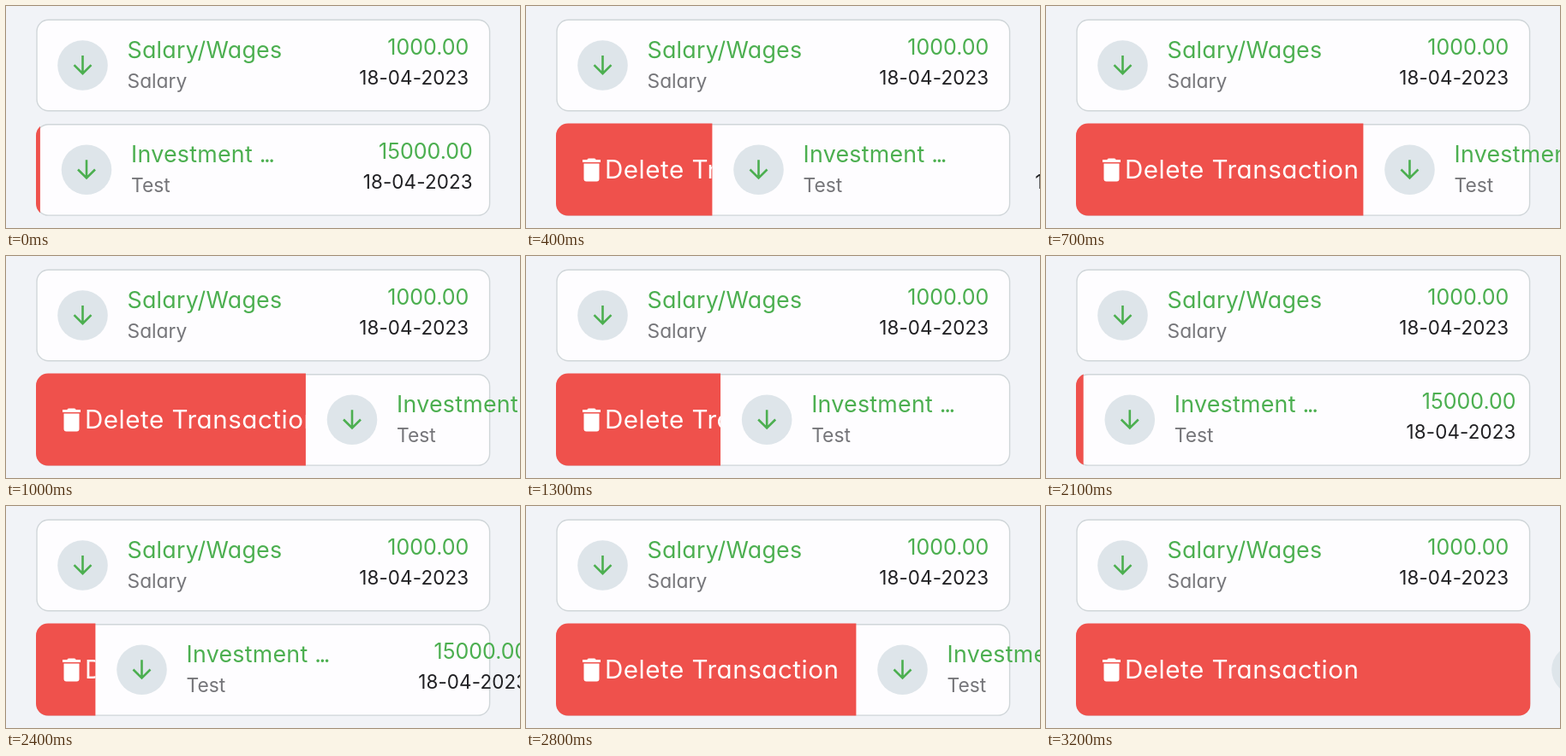
Write an HTML page that moves like this. It is 600 px wide and 260 px high and loops after 3.3 s.

```html
<!DOCTYPE html>
<html lang="en">
<head>
<meta charset="utf-8">
<title>Swipe to delete</title>
<style>
  html, body { margin: 0; width: 100%; height: 100%; overflow: hidden; background: #f1f3f7; }
  svg { display: block; }
  text { font-family: Inter, "Open Sans", sans-serif; font-feature-settings: "cv11"; font-optical-sizing: none; }
  .card { fill: #fefdff; stroke: #d0d6d9; stroke-width: 1.4; }
  .title { font-size: 26.8px; fill: #4caf50; letter-spacing: .25px; }
  .note { font-size: 22.8px; fill: #757579; }
  .sum { font-size: 25px; fill: #4caf50; text-anchor: end; }
  .date { font-size: 22.4px; fill: #212124; text-anchor: end; letter-spacing: .15px; }
  .dots { letter-spacing: -2.4px; }
  .action { font-size: 29.6px; fill: #fff; letter-spacing: .5px; }
</style>
</head>
<body>
<svg width="600" height="260" viewBox="0 0 600 260">
  <defs>
    <clipPath id="round"><rect x="35" y="137.6" width="530.8" height="108" rx="14"/></clipPath>
    <clipPath id="reveal"><rect id="edge" x="35" y="137" width="0" height="110"/></clipPath>
    <g id="badge">
      <circle cx="89.5" cy="69.5" r="29.3" fill="#dee5ea"/>
      <path d="M89.5 58V79M79.5 69.2L89.5 79.2L99.5 69.2" fill="none" stroke="#4caf50" stroke-width="2.6"/>
    </g>
  </defs>

  <rect class="card" x="36" y="16.3" width="528.6" height="106.4" rx="13.5"/>
  <use href="#badge"/>
  <text class="title" x="141.5" y="60.5">Salary/Wages</text>
  <text class="note" x="141.5" y="96">Salary</text>
  <text class="sum" x="540.3" y="56.5">1000.00</text>
  <text class="date" x="540.3" y="92">18-04-2023</text>

  <rect class="card" x="36" y="138.7" width="528.6" height="106.4" rx="13.5"/>
  <g clip-path="url(#round)">
    <g clip-path="url(#reveal)">
      <rect x="35" y="137" width="532" height="110" fill="#ef514c"/>
      <path transform="translate(58.5 174) scale(1.5)" fill="#fff"
        d="M6 19q0 2 2 2h8q2 0 2-2V7H6zM19 4h-3.5l-1-1h-5l-1 1H5v2h14z"/>
      <text class="action" x="92" y="202">Delete Transaction</text>
    </g>
  </g>
  <g id="row">
    <use href="#badge"/>
    <text class="title" x="141.5" y="60.5">Investment <tspan class="dots">...</tspan></text>
    <text class="note" x="141.5" y="96">Test</text>
    <text class="sum" x="540.3" y="56.5">15000.00</text>
    <text class="date" x="540.3" y="92">18-04-2023</text>
  </g>
</svg>
<script>
  const LOOP = 3300, STEP = 100;
  // [step, swipe distance]
  const keys = [[0, 4.5], [4, 182], [7, 335], [10, 314.5], [17, 16.5], [20, 3], [24, 69], [28, 350], [32, 530]];
  const row = document.getElementById("row");
  const edge = document.getElementById("edge");

  const rise = i => (keys[i + 1][1] - keys[i][1]) / (keys[i + 1][0] - keys[i][0]);

  // Harmonic-mean slopes keep the curve from overshooting its keys.
  function slope(i) {
    if (i === 0) return rise(0);
    if (i === keys.length - 1) return rise(i - 1);
    const a = rise(i - 1), b = rise(i);
    return a * b > 0 ? 2 * a * b / (a + b) : 0;
  }

  function swipe(n) {
    const i = Math.max(0, keys.findIndex(k => k[0] >= n) - 1);
    const [x0, y0] = keys[i], [x1, y1] = keys[i + 1];
    const h = x1 - x0, u = (n - x0) / h, v = 1 - u;
    return v * v * (1 + 2 * u) * y0 + u * u * (1 + 2 * v) * y1
      + h * u * v * (v * slope(i) - u * slope(i + 1));
  }

  function draw(now) {
    const x = swipe(Math.floor(now % LOOP / STEP));
    row.setAttribute("transform", `translate(${x} 122.3)`);
    edge.setAttribute("width", x + 0.4);
    requestAnimationFrame(draw);
  }
  draw(0);
</script>
</body>
</html>
```
